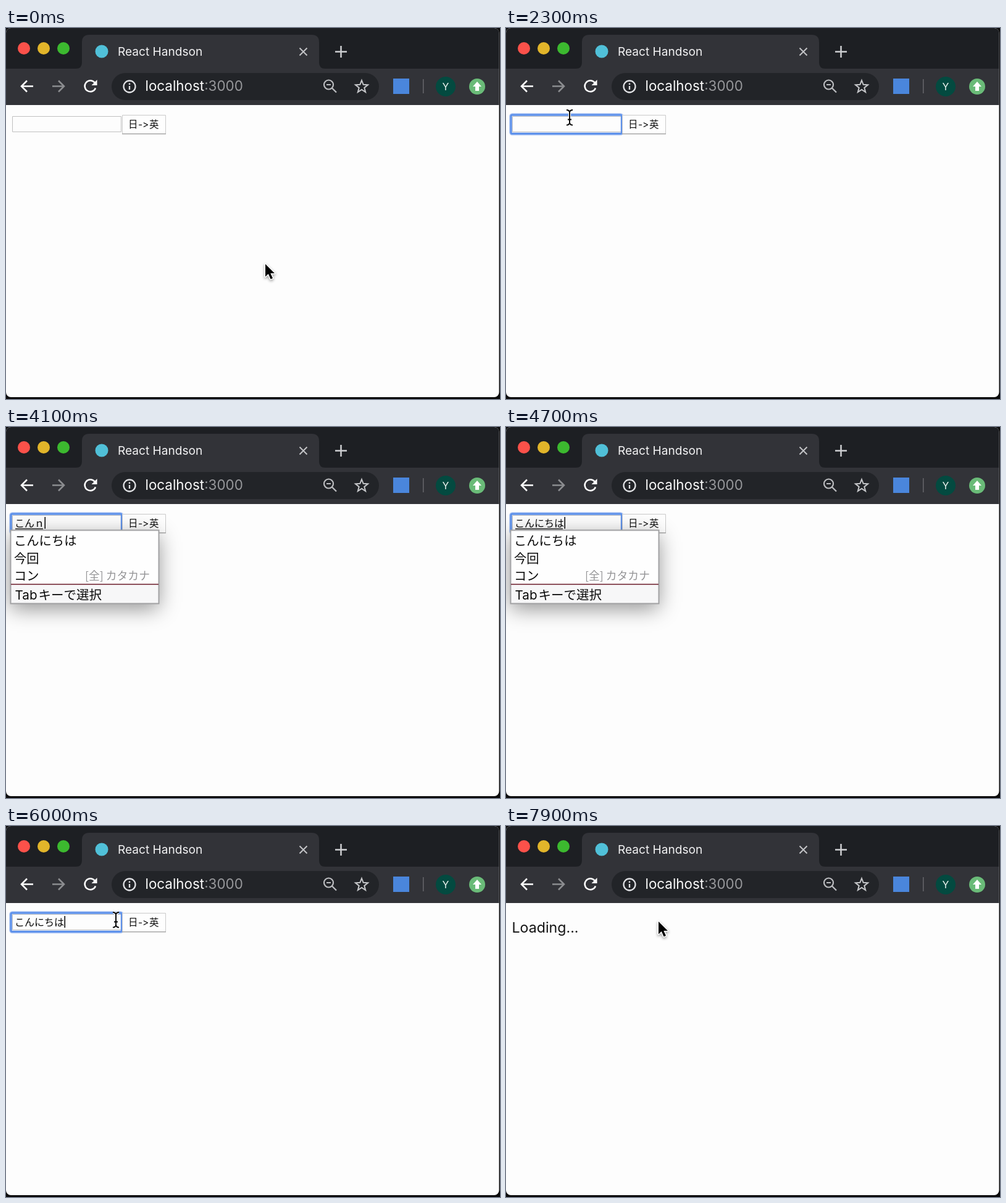
These frames come from a looping animation (800x602 px, 8 s). An HTML page with a canvas:

```html
<!DOCTYPE html>
<html lang="ja">
<head>
<meta charset="utf-8">
<title>React Handson</title>
<style>
html, body { margin: 0; width: 100%; height: 100%; overflow: hidden; background: #0b0b0c; }
canvas { display: block; }
</style>
</head>
<body>
<canvas id="stage" width="800" height="602"></canvas>
<script>
const ctx = document.getElementById('stage').getContext('2d');
const LOOP = 8000, STEP = 100;
const FOCUS = 1400, TYPING = 3500, COMMIT = 4800, POINTER_BACK = 5500, LOADING = 7500;
const LATIN = 'Inter, Roboto, sans-serif';
const JP = '"Noto Sans CJK JP", "Noto Sans CJK", sans-serif';
const STRIP = '#1d1f23', BAR = '#323338', PILL = '#222428', PAGE = '#fdfdfd', INK = '#0a0a0a';

// [time, composed text]
const typed = [
  [3500, 'ｋ'], [3600, 'こ'], [3800, 'こｎ'], [3900, 'こん'], [4100, 'こんｎ'],
  [4200, 'こんに'], [4300, 'こんにｃ'], [4400, 'こんにち'], [4500, 'こんにちｈ'], [4600, 'こんにちは']
];
// [time, x, y]
const path = [
  [0, 420, 383], [200, 420, 383], [900, 106, 150], [1400, 103, 145],
  [5500, 103, 145], [6000, 178, 152], [6500, 243, 153], [7200, 247, 155], [8000, 247, 155]
];

function text(str, x, y, size, color, family = LATIN) {
  ctx.font = `${size}px ${family}`;
  ctx.fillStyle = color;
  ctx.fillText(str, x, y);
}
function rect(x, y, w, h, color) {
  ctx.fillStyle = color;
  ctx.fillRect(x, y, w, h);
}
function round(x, y, w, h, r, color) {
  ctx.beginPath();
  ctx.roundRect(x, y, w, h, r);
  ctx.fillStyle = color;
  ctx.fill();
}
function outline(x, y, w, h, r, color, width = 1) {
  ctx.beginPath();
  ctx.roundRect(x, y, w, h, r);
  ctx.strokeStyle = color;
  ctx.lineWidth = width;
  ctx.stroke();
}
function disc(x, y, r, color) {
  ctx.beginPath();
  ctx.arc(x, y, r, 0, Math.PI * 2);
  ctx.fillStyle = color;
  ctx.fill();
}
function stroke(d, color, width) {
  ctx.strokeStyle = color;
  ctx.lineWidth = width;
  ctx.stroke(new Path2D(d));
}

function drawTabs() {
  rect(0, 0, 799, 66, STRIP);
  disc(29, 33, 10, '#fb514a');
  disc(61, 33, 10, '#e2b52a');
  disc(93, 33, 10, '#3cb92f');
  ctx.fillStyle = BAR;
  ctx.fill(new Path2D('M113 66 Q123 66 123 56 V23 Q123 11 135 11 H495 Q507 11 507 23 V56 Q507 66 517 66 Z'));
  disc(155, 38, 10.5, '#50c0d8');
  text('React Handson', 181, 45, 19.1, '#f2f2f3');
  stroke('M475.5 32.5 L487.5 44.5 M487.5 32.5 L475.5 44.5', '#c2c3c6', 2);
  stroke('M533 38.5 H552 M542.5 29 V48', '#cecfd2', 2.5);
}

function drawToolbar() {
  rect(0, 66, 799, 59, BAR);
  stroke('M44 94.5 H25 M34 85.5 L25 94.5 L34 103.5', '#fff', 2.5);
  stroke('M75 94.5 H94 M85 85.5 L94 94.5 L85 103.5', '#8c8d90', 2.5);
  stroke('M143.5 88.5 A9 9 0 1 0 145 97.5', '#fff', 2.5);
  ctx.fillStyle = '#fff';
  ctx.fill(new Path2D('M147.5 84 V93 H138.5 Z'));

  round(171, 73, 433, 44, 22, PILL);
  stroke('M209.5 95 A9.5 9.5 0 1 1 190.5 95 A9.5 9.5 0 1 1 209.5 95 M200 94 V100', '#e0e1e4', 2.3);
  rect(198.8, 89.5, 2.4, 2.5, '#e0e1e4');
  text('localhost', 225.5, 102, 22.4, '#fafafa');
  const hostWidth = ctx.measureText('localhost').width;
  text(':3000', 225.5 + hostWidth, 102, 22.4, '#96979a');

  stroke('M530 92 A7.5 7.5 0 1 1 515 92 A7.5 7.5 0 1 1 530 92 M528 97.5 L535 104.5 M519 92 H526', '#bcbdc0', 2.2);
  drawStar(576, 95.5, 10.5);

  rect(627, 82, 26, 25, '#4a86dc');
  rect(675, 83, 1.5, 23, '#66676b');
  disc(712, 95, 16, '#034a40');
  text('Y', 706.5, 101, 16, '#eef4f0');
  disc(763, 95, 13, '#6abb78');
  ctx.fillStyle = '#fff';
  ctx.fill(new Path2D('M763 87 L770 95 H766 V102 H760 V95 H756 Z'));
}

function drawStar(cx, cy, r) {
  ctx.beginPath();
  for (let i = 0; i < 10; i++) {
    const a = -Math.PI / 2 + i * Math.PI / 5, d = i % 2 ? r * 0.43 : r;
    ctx.lineTo(cx + d * Math.cos(a), cy + d * Math.sin(a));
  }
  ctx.closePath();
  ctx.strokeStyle = '#c6c7ca';
  ctx.lineWidth = 2;
  ctx.stroke();
}

function drawForm(t) {
  outline(10.5, 143.5, 176, 25, 0, '#c0c0c0');

  if (t >= FOCUS) {
    outline(7.5, 140.5, 180.5, 31.5, 3, 'rgba(92,144,236,.4)', 5);
    outline(8, 141, 179.5, 30.5, 2, '#5c90ea', 3);
  }
  rect(188, 141, 71, 31, '#fefefe');
  outline(188.5, 141.5, 70, 30, 0, '#cacaca');
  rect(188, 171, 71, 1.5, '#a8a8a8');
  text('日', 198, 162, 15.5, '#111', JP);
  // separate calls keep the two signs from joining into one arrow
  text('-', 214, 161.5, 15.5, '#111');
  text('>', 221, 161.5, 15.5, '#111');
  text('英', 232, 162, 15.5, '#111', JP);
  if (t < FOCUS) return;

  const composing = t >= TYPING && t < COMMIT;
  const entry = typed.filter(e => e[0] <= t).pop();
  const str = entry ? entry[1] : '';
  if (composing && t >= 3600) drawCandidates(t >= 3900);

  text(str, 14, 161.5, 16, INK, JP);
  const end = 14 + str.length * 16;
  if (composing) rect(15, 164.6, end - 17, 1.4, '#1a1a1a');
  const since = t >= COMMIT ? t - COMMIT : t - FOCUS;
  if (composing || since % 1000 < 500) rect(end + (str ? 0.5 : 0), 146, 1.5, 19, '#000');
}

function drawCandidates(long) {
  const w = long ? 240 : 184, h = long ? 119 : 90;
  const line = long ? 254.5 : 226;
  ctx.save();
  ctx.shadowColor = 'rgba(0,0,0,.42)';
  ctx.shadowBlur = 32;
  ctx.shadowOffsetY = 9;
  rect(7, 167, w, h, '#fefefe');
  ctx.restore();
  rect(7, line, w, 167 + h - line, '#f7f7f8');
  outline(7.5, 167.5, w, h, 0, '#a2a2a4', 2);
  const items = long ? ['こんにちは', '今回', 'コン'] : ['個', '子'];
  items.forEach((s, i) => text(s, 13, 192 + i * 28.7, 20.3, INK, JP));
  if (long) text('[全] カタカナ', 128, 248, 17.8, '#949496', JP);
  rect(8, line, w - 1, 1.6, '#702432');
  text('Tab', 14.5, line + 25.7, 20.7, INK);
  text('キーで選択', 52.5, line + 25.7, 20.5, INK, JP);
}

function pointerAt(t) {
  let i = 0;
  while (i < path.length - 2 && path[i + 1][0] <= t) i++;
  const [t0, x0, y0] = path[i], [t1, x1, y1] = path[i + 1];
  const k = (t - t0) / (t1 - t0), e = k * k * (3 - 2 * k);
  return [x0 + (x1 - x0) * e, y0 + (y1 - y0) * e];
}

function drawPointer(t) {
  if (t >= TYPING && t < POINTER_BACK) return;
  const [x, y] = pointerAt(t);
  ctx.save();
  ctx.translate(x, y);
  ctx.lineJoin = 'round';
  if (t < LOADING && x > 10 && x < 187 && y < 169) {
    const beam = 'M-5 -12 Q-1 -12 0 -8.5 Q1 -12 5 -12 M0 -9 V9 M-5 12.5 Q-1 12.5 0 9 Q1 12.5 5 12.5 M-3 3.5 H3';
    stroke(beam, '#fff', 4);
    stroke(beam, '#000', 1.9);
  } else {
    const arrow = 'M0 0 V20.5 L4.8 16 L8.6 24.5 L12 23 L8.3 15 H15 Z';
    ctx.shadowColor = 'rgba(0,0,0,.4)';
    ctx.shadowBlur = 4;
    ctx.shadowOffsetY = 2;
    stroke(arrow, '#fff', 3);
    ctx.shadowColor = 'transparent';
    ctx.fillStyle = '#000';
    ctx.fill(new Path2D(arrow));
  }
  ctx.restore();
}

function draw(t) {
  rect(0, 0, 800, 602, '#0b0b0c');
  ctx.save();
  ctx.beginPath();
  ctx.roundRect(0, 0, 798.5, 599, 8);
  ctx.clip();
  rect(0, 0, 800, 602, PAGE);
  drawTabs();
  drawToolbar();
  if (t < LOADING) drawForm(t);
  else text('Loading...', 9.5, 173, 23.2, '#141414');
  ctx.restore();
  drawPointer(t);
}

const start = performance.now();
function tick() {
  const t = Math.max(0, performance.now() - start) % LOOP;
  draw(Math.floor(t / STEP) * STEP);
  requestAnimationFrame(tick);
}
tick();
</script>
</body>
</html>
```
